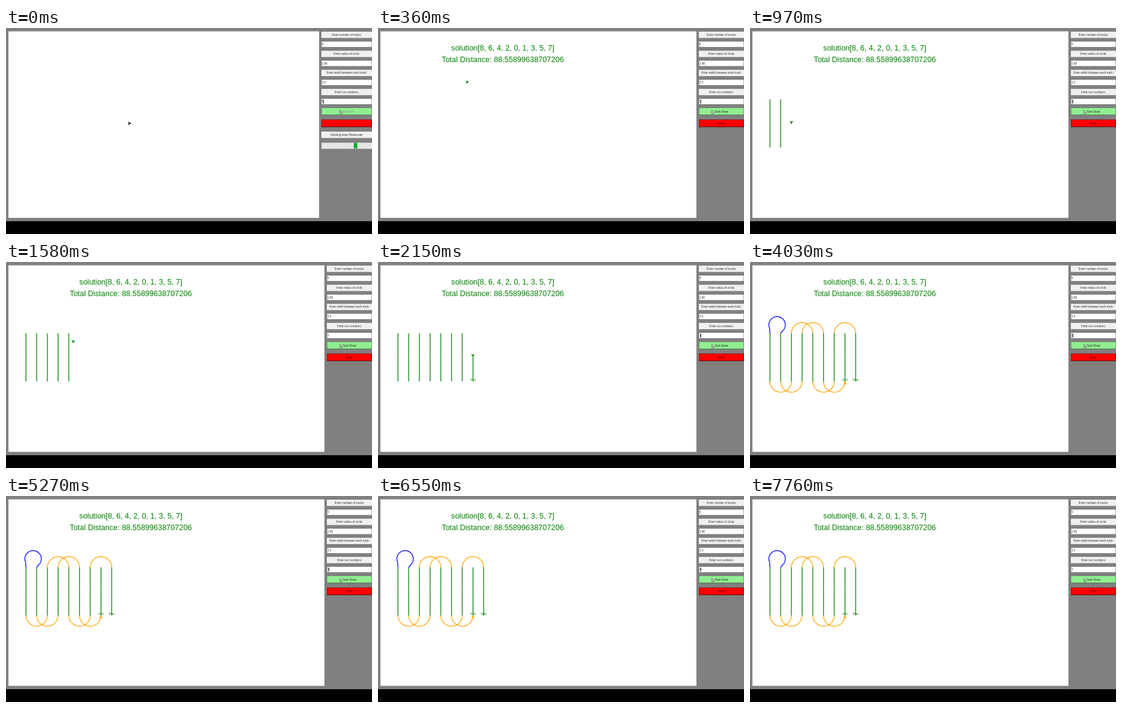
An HTML page with a canvas for the animation above (7880 ms loop, 600 by 338 pixels).

```html
<!DOCTYPE html>
<html lang="en">
<head>
<meta charset="utf-8">
<title>Track planner</title>
<style>
html, body { margin: 0; width: 100%; height: 100%; overflow: hidden; background: #000; }
canvas { display: block; width: 600px; height: 338px; }
</style>
</head>
<body>
<canvas id="stage" width="600" height="338"></canvas>
<script>
const ctx = document.getElementById('stage').getContext('2d');
const LOOP = 7880, WIDE_AT = 60, SPEED = 0.752;
const GREEN = '#008000', ORANGE = '#ffa500', BLUE = '#0000ff';
const TOP = 117, MID = 156.5, BOTTOM = 196, GAP = 17.57, R = GAP;
const HOME = 205;
const trackX = i => 32.7 + GAP * i;
const order = [8, 6, 4, 2, 0, 1, 3, 5, 7];
const SANS = '"Liberation Sans", Arial, sans-serif';
const UI = '4.4px "Open Sans", "Noto Sans", sans-serif';

// Pen program: timed moves along polylines and texts that appear on arrival
const moves = [], notes = [];
let clock = 89, pos = [HOME, MID];

function travel(pts, color, pen, heading) {
  const path = [pos, ...pts], lens = [];
  let total = 0;
  for (let i = 1; i < path.length; i++) {
    const d = Math.hypot(path[i][0] - path[i - 1][0], path[i][1] - path[i - 1][1]);
    lens.push(d);
    total += d;
  }
  moves.push({ path, lens, total, color, pen, heading, at: clock });
  clock += total / SPEED;
  pos = path[path.length - 1];
}

function write(text, x, y, size) {
  notes.push({ text, x, y, size, at: clock });
}

function arcPoints(cx, cy, r, from, to, n = 28) {
  return Array.from({ length: n + 1 }, (_, i) => {
    const a = from + (to - from) * i / n;
    return [cx + r * Math.cos(a), cy + r * Math.sin(a)];
  });
}

const DOWN = Math.PI / 2, UP = -DOWN;

travel([[HOME, 36.5]], GREEN, false, 0);
write('solution[' + order.join(', ') + ']', 204.5, 36.5, 12.55);
travel([[HOME, 56]], GREEN, false, 0);
write('Total Distance: 88.55899638707206', 204.5, 56, 12.5);

for (let i = 0; i < 9; i++) {
  const x = trackX(i);
  travel([[x, MID]], GREEN, false, i ? DOWN : 0);
  travel([[x, BOTTOM]], GREEN, true, DOWN);
  if (i === 7) write('End', x, 194.5, 4.5);
  if (i === 8) write('Start', x, 194.5, 4.5);
  travel([[x, MID]], GREEN, false, DOWN);
  travel([[x, TOP]], GREEN, true, DOWN);
}

clock += 46;
let tint = ORANGE;
for (let i = 0; i < 8; i++) {
  const a = trackX(order[i]), b = trackX(order[i + 1]);
  const top = i % 2 === 0, y = top ? TOP : BOTTOM;
  if (i) travel([[a, y]], tint, false, top ? UP : DOWN);
  if (order[i] === 0) {
    tint = BLUE;
    const loop = arcPoints(44.4, 103.1, 13.5, Math.PI * 0.86, Math.PI * 2.28, 40);
    travel([...loop, [b, TOP]], tint, true);
  } else {
    tint = ORANGE;
    const turn = (b < a) === top ? -Math.PI : Math.PI;
    const from = b < a ? 0 : Math.PI;
    travel(arcPoints((a + b) / 2, y, R, from, from + turn), tint, true);
  }
}

function box(x, y, w, h, fill) {
  ctx.fillStyle = fill;
  ctx.fillRect(x, y, w, h);
}

function label(text, x, y, color = '#1c1c1c', font = UI, align = 'center') {
  ctx.font = font;
  ctx.textAlign = align;
  ctx.fillStyle = color;
  ctx.fillText(text, x, y);
}

function button(text, x, y, fill, edge, ink, mid) {
  box(x, y, 600 - x, 12.5, edge);
  box(x + 0.5, y + 0.5, 599 - x, 11, fill);
  label(text, mid, y + 7.8, ink);
}

function arrow(x, y, angle, color) {
  ctx.save();
  ctx.translate(x, y);
  ctx.rotate(angle);
  ctx.fillStyle = ctx.strokeStyle = color;
  ctx.lineWidth = 0.4;
  ctx.beginPath();
  [[0, 0], [-4.6, -2.5], [-3.5, 0], [-4.6, 2.5]].forEach(p => ctx.lineTo(...p));
  ctx.closePath();
  ctx.fill();
  ctx.stroke();
  ctx.restore();
}

function panel(t, wide) {
  const x = wide ? 526 : 517, mid = wide ? 563 : 558.5;
  const fields = [
    ['Enter number of tracks:', '9'],
    ['Enter radius of circle:', '2.88'],
    ['Enter width between each track:', '3.5'],
    ['Enter run numbers:', '3']
  ];
  fields.forEach(([name, value], i) => {
    const y = 6 + i * 31.3;
    box(x, y, 600 - x, 10.3, '#f0f0f0');
    label(name, mid, y + 6.8);
    box(x, y + 15.6, 600 - x, 10, '#6c6c6c');
    box(x + 0.5, y + 16.2, 599 - x, 9, '#fff');
    label(value, x + 1, y + 22.4, '#1c1c1c', UI, 'left');
  });
  const phase = t % 900;
  if (phase < 450 || phase >= 750) box(x + 2.6, 117.5, 1, 6.5, '#000');

  button('Start Draw', x, 130.7, '#90ee90', '#4d6b4d', wide ? '#101810' : '#71946f', mid);
  button('Reset', x, 150.2, '#ff0000', '#5c1010', wide ? '#4a0000' : '#b52020', mid);
  if (!wide) {
    box(x, 170, 83, 10.5, '#f0f0f0');
    label('Fetching data, Please wait', mid, 176.8);
    box(x, 188, 83, 10.5, '#bcbcbc');
    box(x + 0.5, 188.5, 82.5, 9.5, '#e6e6e6');
    box(570 + t * 0.07, 188.5, 6, 9, '#06b025');
  }

  // mouse pointer
  ctx.beginPath();
  [[547.4, 135.2], [547.4, 140.4], [548.6, 139.4], [549.5, 141.2],
   [550.4, 140.8], [549.6, 139], [551.1, 138.9]].forEach(p => ctx.lineTo(...p));
  ctx.closePath();
  ctx.fillStyle = '#fff';
  ctx.strokeStyle = '#222';
  ctx.lineWidth = 0.6;
  ctx.fill();
  ctx.stroke();
}

function trace(m, t) {
  let left = Math.min(m.total, (t - m.at) * SPEED);
  let [x, y] = m.path[0], angle = m.heading;
  ctx.beginPath();
  ctx.moveTo(x, y);
  for (let i = 0; i < m.lens.length && left > 0; i++) {
    const [ax, ay] = m.path[i], [bx, by] = m.path[i + 1];
    if (m.lens[i] < 1e-6) continue;
    const k = Math.min(1, left / m.lens[i]);
    x = ax + (bx - ax) * k;
    y = ay + (by - ay) * k;
    ctx.lineTo(x, y);
    if (m.heading === undefined) angle = Math.atan2(by - ay, bx - ax);
    left -= m.lens[i];
  }
  if (m.pen) {
    ctx.strokeStyle = m.color;
    ctx.lineWidth = 1.25;
    ctx.stroke();
  }
  return [x, y, angle || 0, m.color];
}

function draw(t) {
  const wide = t >= WIDE_AT;
  box(0, 0, 600, 338, '#000');
  box(0, 0, 600, 317, '#808080');
  box(4, 5.5, (wide ? 522 : 513.3) - 4, 306, '#fff');
  panel(t, wide);

  let pen = [HOME, MID, 0, '#000'];
  for (const m of moves) if (t >= m.at) pen = trace(m, t);
  for (const n of notes) {
    if (t >= n.at) label(n.text, n.x, n.y, GREEN, n.size + 'px ' + SANS);
  }
  if (t >= clock) pen[2] = UP;
  arrow(...pen);
}

const start = performance.now();
function tick() {
  draw((performance.now() - start) % LOOP);
  requestAnimationFrame(tick);
}
tick();
</script>
</body>
</html>
```
